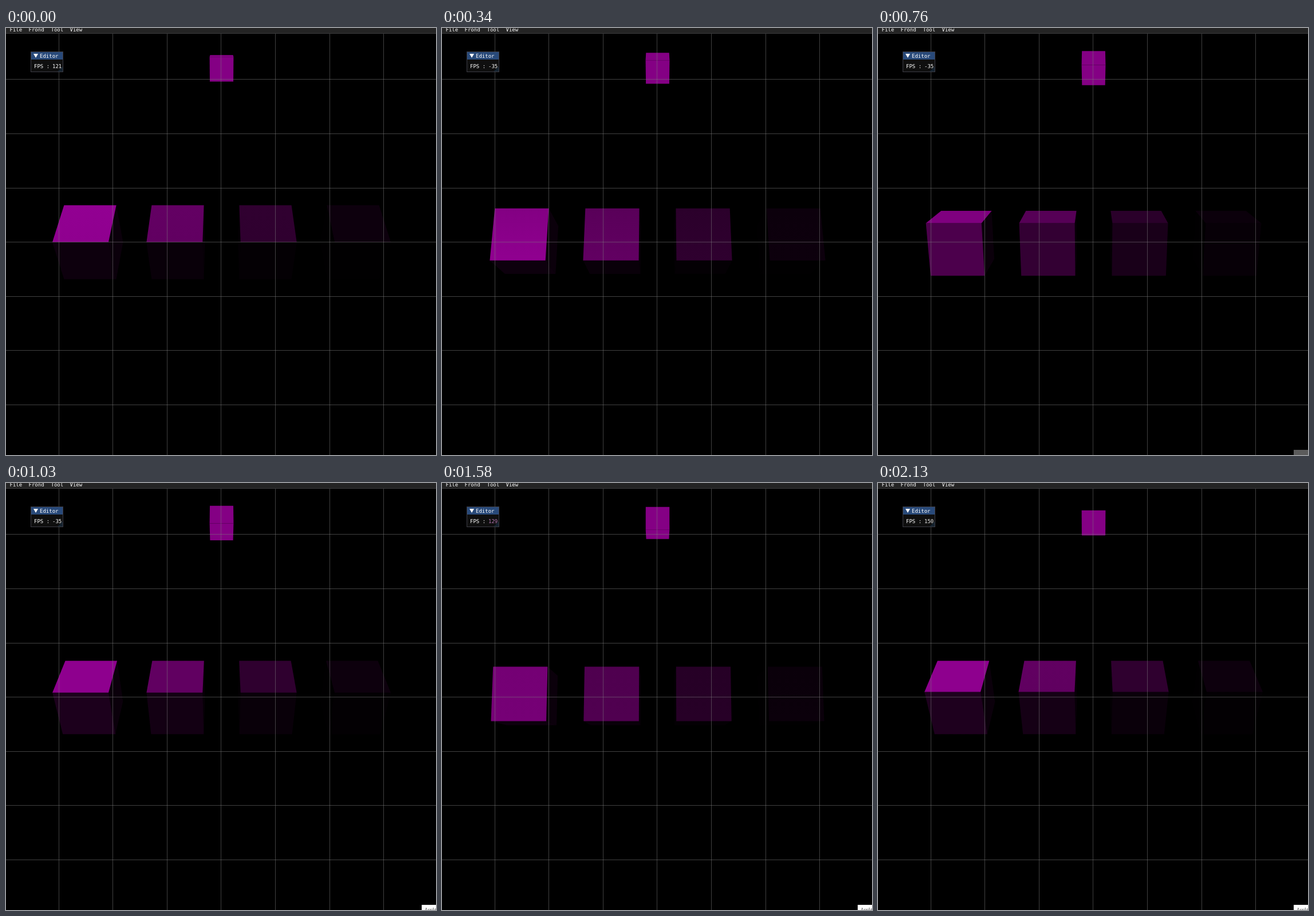
Recreate the animation shown at these times as an HTML page with a canvas. Size 751 by 745 pixels, loop 2.2 s.

```html
<!DOCTYPE html>
<html>
<head>
<meta charset="utf-8">
<style>
html, body { margin: 0; width: 100%; height: 100%; overflow: hidden; background: #000; }
canvas { display: block; }
</style>
</head>
<body>
<canvas id="stage" width="751" height="745"></canvas>
<script>
const ctx = document.getElementById('stage').getContext('2d');
const LOOP = 2200, STEPS = 32, DEPTH = 930, CX = 376, CY = 373.7;
const RAD = Math.PI / 180;
const purple = v => `rgb(${Math.round(v)},0,${Math.round(v)})`;

function rect(x, y, w, h, color) {
  ctx.fillStyle = color;
  ctx.fillRect(x, y, w, h);
}

function poly(points, fill) {
  ctx.beginPath();
  points.forEach(([x, y]) => ctx.lineTo(x, y));
  ctx.closePath();
  ctx.fillStyle = fill;
  ctx.fill();
}

function text(str, x, y, color = '#fff') {
  ctx.font = '9px "DejaVu Sans Mono", monospace';
  ctx.fillStyle = color;
  ctx.fillText(str, x, y);
}

// Ambient + diffuse from a light at 45 degrees + a narrow highlight.
function shade(normal, shift) {
  const diffuse = Math.max(0, Math.cos((normal - 45) * RAD));
  const highlight = Math.exp(-(((normal + shift - 26) / 10) ** 2));
  return 13 + 130 * diffuse + 18 * highlight;
}

// A cube turned about its horizontal axis, seen in perspective.
function cube(x, y, half, angle, light) {
  const corner = (side, deg) => {
    const r = half * Math.SQRT2;
    const k = 1 / (1 - r * Math.cos(deg * RAD) / DEPTH);
    return [CX + (x + side * half) * k, CY - (y + r * Math.sin(deg * RAD)) * k];
  };
  const normals = [0, 90, 180, 270].map(d => angle + d);
  if (Math.abs(x) > half) {
    const side = x < 0 ? 1 : -1;
    poly(normals.map(n => corner(side, n + 45)), purple(light ? 11 * light : 132));
  }
  for (const n of normals) {
    const a = corner(-1, n + 45), b = corner(1, n + 45);
    const c = corner(1, n - 45), d = corner(-1, n - 45);
    if (a[1] >= d[1]) continue;
    let fill = purple(132);
    if (light) {
      const normal = ((n + 180) % 360 + 360) % 360 - 180;
      fill = ctx.createLinearGradient(0, a[1], 0, d[1]);
      fill.addColorStop(0, purple(light * shade(normal, -5)));
      fill.addColorStop(1, purple(light * shade(normal, 5)));
    }
    poly([a, b, c, d], fill);
  }
}

function grid() {
  for (let k = -3; k <= 3; k++) {
    rect(Math.floor(375.8 + 94.6 * k), 10, 1, 735, 'rgba(128,128,128,.5)');
    rect(0, Math.floor(373.6 + 94.6 * k), 751, 1, 'rgba(128,128,128,.5)');
  }
}

function menu() {
  rect(0, 0, 751, 9, '#242424');
  rect(0, 9, 751, 1, '#3a3a3c');
  text('File', 6.5, 6);
  text('Frond', 39.5, 6);
  text('Tool', 78.5, 6);
  text('View', 111.5, 6);
}

function panel(step) {
  rect(43, 41, 57, 36, '#3c3c44');
  rect(44, 42, 55, 13, '#294a7a');
  rect(44, 55, 55, 21, '#0f0f0f');
  poly([[99, 67], [99, 76], [90, 76]], '#15232f');
  poly([[48, 45], [56, 45], [52, 52]], '#fff');
  text('Editor', 59, 51.5);
  text('FPS :', 49, 70);
  const [fps, color] =
    step < 2 ? ['121', '#fff'] :
    step < 17 ? ['-35', '#fff'] :
    step < 21 ? ['-35', '#e0a0e0'] :
    step < 25 ? ['129', '#b478b4'] :
    step < 29 ? ['-55', '#ddd'] : ['150', '#eee'];
  text(fps, 81, 70, color);
}

function tooltip(step) {
  ctx.globalAlpha = Math.min(1, Math.max(0, (step - 10) * 0.36));
  rect(726, 736, 25, 9, '#fff');
  ctx.font = '9px "Open Sans", sans-serif';
  ctx.fillStyle = '#555';
  ctx.fillText('Arrêt', 731, 748);
  ctx.globalAlpha = 1;
}

function draw() {
  const t = performance.now() % LOOP;
  const step = Math.min(STEPS - 1, Math.floor((t + 10) / (LOOP / STEPS)));
  rect(0, 0, 751, 745, '#000');
  [1, 0.68, 0.33, 0.09].forEach((light, i) =>
    cube(-229 + 153 * i, 0, 45.6, 45 - 5.56 * step, light));
  cube(0.5, 303.5, 20.3, -23 - 2.7 * step, 0);
  grid();
  menu();
  panel(step);
  tooltip(step);
  requestAnimationFrame(draw);
}
draw();
</script>
</body>
</html>
```
